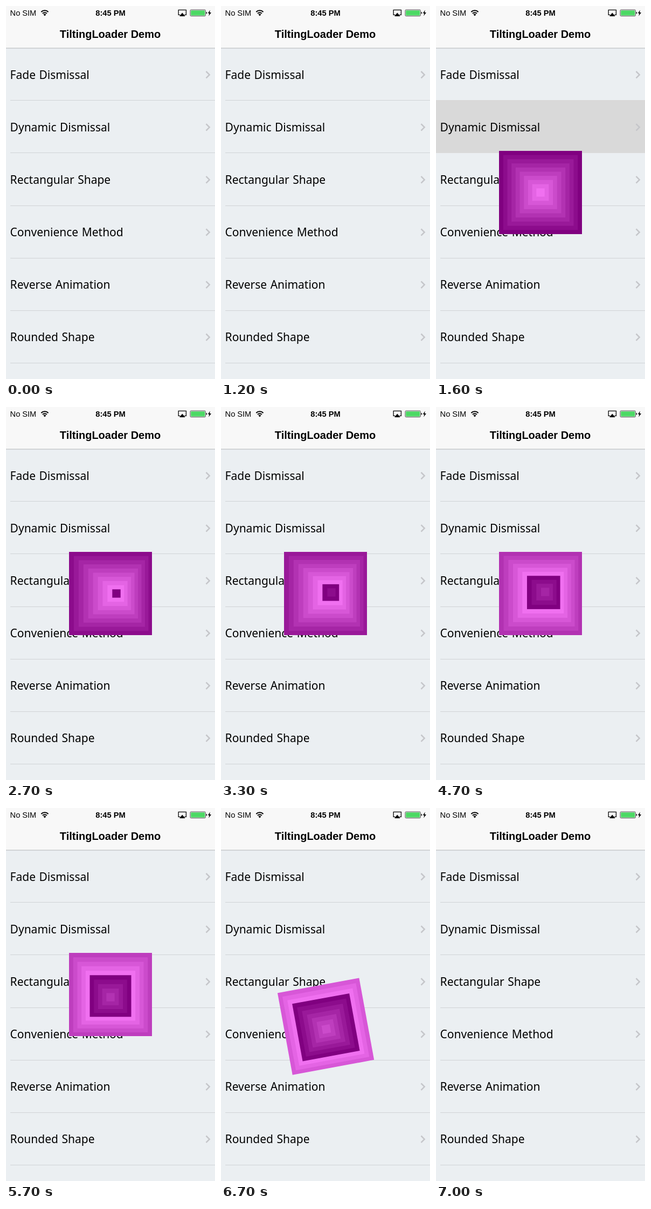
These frames come from a looping animation (388 px wide and 690 px high, 7.7 s). An HTML page:

```html
<!DOCTYPE html>
<html lang="en">
<head>
<meta charset="utf-8">
<title>TiltingLoader Demo</title>
<style>
  html, body { margin: 0; width: 100%; height: 100%; overflow: hidden; background: #ebeff2; }
  svg { display: block; width: 100vw; height: 100vh; }
  .bar { font-family: "Liberation Sans", Arial, sans-serif; fill: #000; }
  .row { font-family: "Noto Sans", "Open Sans", sans-serif; font-size: 21px; word-spacing: 1px; fill: #000; }
</style>
</head>
<body>
<svg viewBox="0 0 388 690">
  <rect width="388" height="690" fill="#ebeff2"/>
  <rect width="388" height="78" fill="#f8f8f8"/>
  <rect y="77.5" width="388" height="1" fill="#b4b6b8"/>

  <g class="bar">
    <text x="7.6" y="18" font-size="14.6">No SIM</text>
    <text x="194" y="18" font-size="14.7" font-weight="bold" text-anchor="middle">8:45 PM</text>
    <text x="193.5" y="58.8" font-size="20" font-weight="bold" text-anchor="middle">TiltingLoader Demo</text>
  </g>

  <!-- wifi -->
  <g fill="none" stroke="#000" stroke-width="2">
    <path d="M65.3 11a9.4 9.4 0 0 1 13.2 0"/>
    <path d="M67.9 13.8a5.7 5.7 0 0 1 8 0"/>
  </g>
  <path d="M71.9 18.4l-2.5-2.6a3.6 3.6 0 0 1 5 0z"/>

  <!-- screen sharing -->
  <path d="M323.4 16.4h-3.2V7.3h14.2v9.1h-3.2" fill="none" stroke="#000" stroke-width="1.3"/>
  <path d="M327.3 12.4l5.4 6.6h-10.8z"/>

  <!-- battery -->
  <rect x="342" y="7" width="28.4" height="11.6" rx="1.6" fill="#f8f8f8" stroke="#222" stroke-width=".8"/>
  <rect x="343.2" y="8.2" width="26" height="9.2" rx=".6" fill="#4cd964"/>
  <path d="M371.6 10.8q1.7 .4 1.7 2t-1.7 2z"/>
  <path d="M378.8 7.4l-4 6.2h2.6l-1.2 4.8 4.8-6.4h-2.8z"/>

  <g id="lines"></g>
  <rect id="pick" y="174" width="388" height="98" fill="#d9d9d9"/>
  <g id="list"></g>
  <g id="loader"></g>
</svg>
<script>
const LOOP = 7700, STEP = 100;
const SHOW = 1600, DROP = 6510, GONE = 6950;
const COUNT = 10, SIZE = 154, CX = 194, CY = 345;
const SHIFT_EVERY = 700;
const ROW_MID = 127, ROW_PITCH = 97.1;
const rows = ["Fade Dismissal", "Dynamic Dismissal", "Rectangular Shape",
  "Convenience Method", "Reverse Animation", "Rounded Shape"];
// time, x and y offset of the innermost square
const tilts = [[1600, 0, 0], [2500, 11, 0], [3000, 11, 0],
  [3700, 11, -5], [4400, 11, -5], [5400, 0, 5]];

const byId = id => document.getElementById(id);
const lines = byId("lines"), list = byId("list");
const loader = byId("loader"), pick = byId("pick");

function add(parent, tag, attrs, text) {
  const el = document.createElementNS("http://www.w3.org/2000/svg", tag);
  for (const key in attrs) el.setAttribute(key, attrs[key]);
  if (text) el.textContent = text;
  return parent.appendChild(el);
}

rows.forEach((label, i) => {
  const mid = ROW_MID + ROW_PITCH * i;
  add(lines, "rect", { x: 8, y: Math.round(mid + 47.3), width: 380, height: 1, fill: "#d0d3d6" });
  add(list, "text", { class: "row", x: 7.6, y: mid + 7.5 }, label);
  add(list, "path", { d: `M371.5 ${mid - 6}l6.2 6.2l-6.2 6.2`, fill: "none",
    stroke: "#c5c6ca", "stroke-width": 2.5 });
});

const squares = Array.from({ length: COUNT }, (_, i) => {
  const side = SIZE * (1 - i / COUNT);
  return add(loader, "rect", { x: -side / 2, y: -side / 2, width: side, height: side });
});

const clamp = v => Math.min(1, Math.max(0, v));

function shade(n) {
  const k = 112 * n / (COUNT - 1);
  return `rgb(${128 + k},${k},${128 + k})`;
}

function tiltAt(t) {
  let [, x, y] = tilts[0];
  for (let i = 1; i < tilts.length; i++) {
    const [t0, x0, y0] = tilts[i - 1], [t1, x1, y1] = tilts[i];
    if (t < t0) break;
    const u = clamp((t - t0) / (t1 - t0)), e = u * u * (3 - 2 * u);
    x = x0 + (x1 - x0) * e;
    y = y0 + (y1 - y0) * e;
  }
  return [x, y];
}

function draw(t) {
  pick.setAttribute("opacity", t < SHOW ? 0 : 1 - clamp((t - SHOW - 50) / 450));

  const visible = t >= SHOW && t < GONE;
  loader.setAttribute("visibility", visible ? "visible" : "hidden");
  if (!visible) return;

  const fall = Math.max(0, t - DROP) / 1000;
  const y = CY + 1635 * fall * fall;
  loader.setAttribute("transform", `translate(${CX + 3 * fall} ${y}) rotate(${-54.7 * fall})`);

  const shift = Math.floor((t - SHOW) / SHIFT_EVERY);
  const [dx, dy] = tiltAt(t);
  squares.forEach((sq, i) => {
    const depth = i / (COUNT - 1);
    sq.setAttribute("fill", shade((i + shift) % COUNT));
    sq.setAttribute("transform", `translate(${dx * depth} ${dy * depth})`);
  });
}

const start = performance.now();
function tick() {
  const t = (performance.now() - start) % LOOP;
  draw(Math.floor(t / STEP) * STEP);
  requestAnimationFrame(tick);
}
tick();
</script>
</body>
</html>
```
